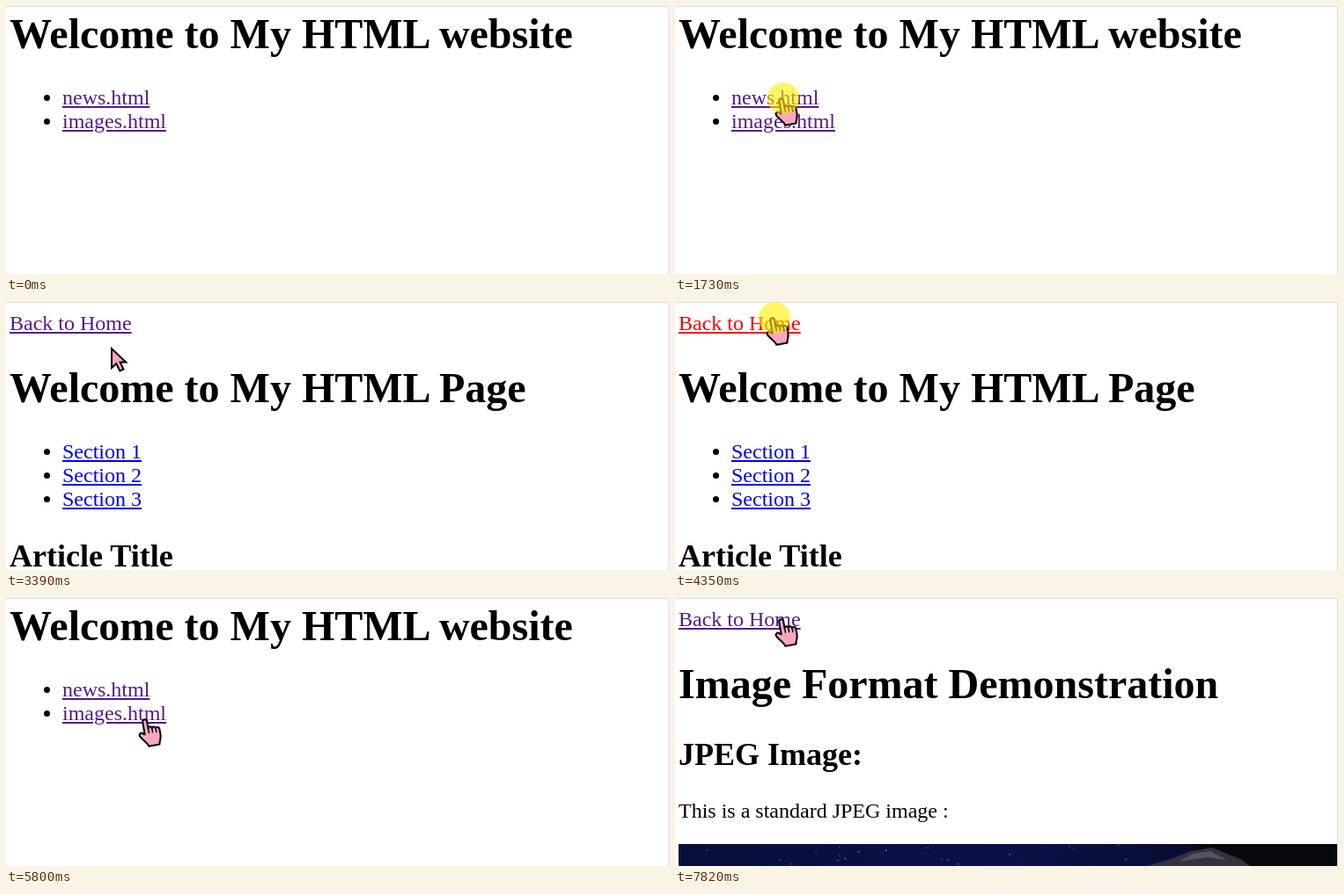
Write an HTML page that moves like this. It is 753x305 px and loops after 8 s.

```html
<!DOCTYPE html>
<html lang="en">
<head>
<meta charset="utf-8">
<title>HTML website</title>
<style>
  html, body { margin: 0; width: 100%; height: 100%; overflow: hidden; background: #fff; }
  #stage { position: relative; width: 753px; height: 305px; overflow: hidden; background: #fff;
    font: 24px "Liberation Serif", "Times New Roman", serif; color: #000; }
  #frame { position: absolute; inset: 0; border: solid #ddd; border-width: 1px 1px 0 0; }
  .page { position: absolute; left: 4px; top: 11px; width: 748px; visibility: hidden; }
  #home { top: -28px; }
  ul { padding-left: 60px; }
  a { color: #551a8b; text-decoration: underline; }
  a.new { color: #00e; }
  a.active { color: #f00; }
  .photo { display: block; }
  #overlay { position: absolute; inset: 0; }
  #overlay > g { visibility: hidden; }
  .page.shown, #overlay > g.shown { visibility: visible; }
</style>
</head>
<body>
<div id="stage">
  <div id="frame"></div>

  <div class="page" id="home">
    <h1>Welcome to My HTML website</h1>
    <ul>
      <li><a id="newsLink">news.html</a></li>
      <li><a id="imagesLink">images.html</a></li>
    </ul>
  </div>

  <div class="page" id="news">
    <a id="backLink">Back to Home</a>
    <h1>Welcome to My HTML Page</h1>
    <ul>
      <li><a class="new">Section 1</a></li>
      <li><a class="new">Section 2</a></li>
      <li><a class="new">Section 3</a></li>
    </ul>
    <h2>Article Title</h2>
  </div>

  <div class="page" id="images">
    <a>Back to Home</a>
    <h1>Image Format Demonstration</h1>
    <h2>JPEG Image:</h2>
    <p>This is a standard JPEG image :</p>
    <svg class="photo" width="748" height="60">
      <linearGradient id="sky">
        <stop stop-color="#080e3a"/>
        <stop offset=".5" stop-color="#0b1148"/>
        <stop offset=".8" stop-color="#080c30"/>
      </linearGradient>
      <rect width="748" height="60" fill="url(#sky)"/>
      <g id="stars" fill="#8f9fd0"></g>
      <path d="M585 0H748V60H600Z" fill="#08080f"/>
      <path d="M525 27L562 16L582 8L606 4L640 18L652 27Z" fill="#33323e"/>
      <path d="M568 20L584 11L604 8L622 18L600 15Z" fill="#55535f"/>
    </svg>
  </div>

  <svg id="overlay" width="753" height="305" stroke="#000" stroke-width="2" stroke-linejoin="round" stroke-linecap="round" fill="#f7a8c0">
    <g id="arrow">
      <path stroke-linejoin="miter" d="M1 2V24L6.3 19.2L10.3 27.5L14.5 25.5L10.6 17.5H17.2Z"/>
    </g>
    <g id="hand">
      <g transform="translate(-2.5 -1) rotate(-10)">
        <path d="M-3 18V4C-3 .3 2 .3 2 4V12C2 9.6 6.2 9.6 6.2 12.5C6.2 10.4 10.4 10.6 10.4 13.5C10.4 11.6 14.5 12 14.5 15V22C14.5 26 12 28 11.6 32H-.8C-1 28.5 -5.5 25 -8.6 19.8C-10.4 16.6 -7 14.6 -5.2 16.6Z"/>
        <path fill="none" stroke-width="1.5" d="M2 12V17M6.2 12.5V17M10.4 13.5V17.5"/>
      </g>
    </g>
    <g id="beam" fill="none">
      <path stroke-width="6" stroke-linecap="butt" d="M-8 -11H8M0 -11V11M-8 11H8"/>
      <path stroke="#e3a6b2" stroke-linecap="square" d="M-5 -11H5M0 -11V11M-5 11H5"/>
    </g>
    <g id="halo" stroke="none"><circle r="18" fill="#fff000" fill-opacity=".6"/></g>
  </svg>
</div>

<script>
const LOOP = 8000, FPS = 15;
const $ = id => document.getElementById(id);

const easeOut = u => 1 - (1 - u) ** 3;
const easeInOut = u => u * u * (3 - 2 * u);

// Each move follows a Bezier curve; times are in steps of 1/FPS s.
const moves = [
  { from: 8, to: 19, ease: easeOut, curve: [[553, 268], [406, 150], [259, 95], [112, 107]] },
  { from: 19, to: 22, ease: easeInOut, curve: [[112, 107], [123, 105]] },
  { from: 37, to: 50, ease: easeInOut, curve: [[123, 105], [196, -20], [310, 40], [120, 55]] },
  { from: 50, to: 55, ease: easeInOut, curve: [[120, 55], [113, 18]] },
  { from: 78, to: 90, ease: easeInOut, curve: [[113, 18], [130, 100], [158, 160], [165, 131]] },
  { from: 106, to: 117, ease: easeInOut, curve: [[165, 131], [186, 100], [190, 30], [123, 24]] }
];

// A click shows the halo, turns the link red, paints a page and lets the cursor react to it.
const clicks = [
  { link: 'newsLink', page: 'news', down: 26, press: 27, up: 29, paint: 30, react: 31 },
  { link: 'backLink', page: 'home', down: 65, press: 65, up: 69, paint: 71, react: 76 },
  { link: 'imagesLink', page: 'images', down: 95, press: 95, up: 98, paint: 102, react: 99 }
];

const latest = (list, key, step) => list.filter(item => item[key] <= step).pop();
const pageAt = (key, step) => latest(clicks, key, step)?.page ?? 'home';

function bezier(points, t) {
  if (points.length === 1) return points[0];
  const mix = (a, b) => a + (b - a) * t;
  const inner = points.slice(1).map(([x, y], i) => [mix(points[i][0], x), mix(points[i][1], y)]);
  return bezier(inner, t);
}

function cursorAt(step) {
  const move = latest(moves, 'from', step);
  if (!move) return null;
  const u = Math.min(1, (step - move.from) / (move.to - move.from));
  return bezier(move.curve, move.ease(u));
}

function shapeOver(page, [x, y]) {
  const hits = selector => [...$(page).querySelectorAll(selector)].some(el => {
    const r = el.getBoundingClientRect();
    return x >= r.left && x <= r.right && y >= r.top && y <= r.bottom;
  });
  return hits('a') ? 'hand' : hits('h1, h2, p') ? 'beam' : 'arrow';
}

const show = (id, on) => $(id).classList.toggle('shown', on);

function place(id, on, point) {
  show(id, on);
  if (on) $(id).setAttribute('transform', `translate(${point.map(Math.round)})`);
}

function draw(time) {
  const step = Math.floor((time + 14) * FPS / 1000);
  const page = pageAt('paint', step);
  for (const id of ['home', 'news', 'images']) show(id, id === page);
  for (const c of clicks) $(c.link).classList.toggle('active', step >= c.press && step < c.up);

  const point = cursorAt(step);
  const shape = point && shapeOver(pageAt('react', step), point);
  for (const id of ['arrow', 'hand', 'beam']) place(id, id === shape, point);
  place('halo', clicks.some(c => step >= c.down && step < c.up), point);
}

function scatterStars() {
  let seed = 7;
  const random = () => (seed = seed * 16807 % 2147483647) / 2147483647;
  for (let i = 0; i < 22; i++) {
    const star = document.createElementNS($('stars').namespaceURI, 'circle');
    star.setAttribute('cx', random() * 550);
    star.setAttribute('cy', random() * 25);
    star.setAttribute('r', 0.4 + random() * 0.4);
    $('stars').append(star);
  }
}

scatterStars();
const start = performance.now();
function tick() {
  draw((performance.now() - start) % LOOP);
  requestAnimationFrame(tick);
}
tick();
</script>
</body>
</html>
```
